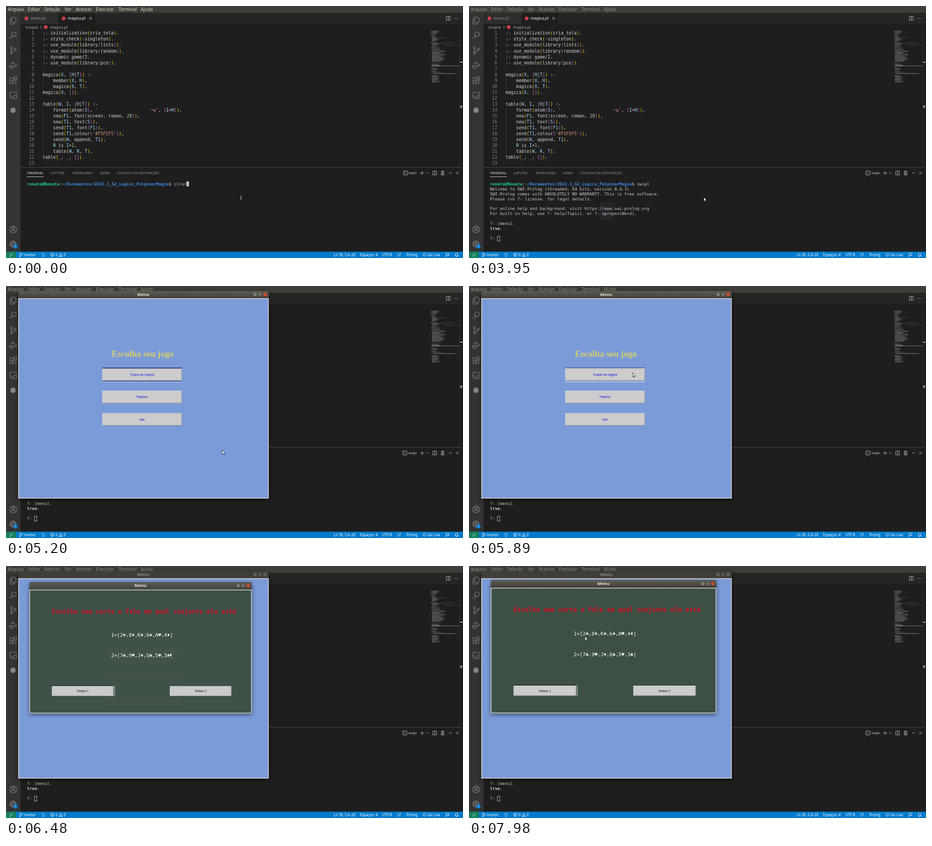
An HTML page for the animation above (8 s loop, 1007 px wide and 556 px high).

```html
<!DOCTYPE html>
<html lang="pt">
<head>
<meta charset="utf-8">
<title>Menu</title>
<style>
html, body { margin: 0; width: 100%; height: 100%; overflow: hidden; background: #1e1e1e; }
svg { display: block; width: 1007px; height: 556px; }
text { white-space: pre; }
.ui { font-family: "Noto Sans", "Open Sans", sans-serif; }
.mono { font-family: "DejaVu Sans Mono", monospace; }
.sans { font-family: "Liberation Sans", Arial, sans-serif; }
.serif { font-family: "Liberation Serif", serif; }
.line { fill: none; stroke: #858585; stroke-width: 1.2; }
.thin { fill: none; stroke: #c5c5c5; stroke-width: .9; }
.win { filter: drop-shadow(0 3px 5px rgba(0, 0, 0, .5)); }
</style>
</head>
<body>
<svg id="stage" viewBox="0 0 1007 556" xml:space="preserve"></svg>
<script>
const LOOP = 8000;
const stage = document.getElementById('stage');

const text = (x, y, str, size, fill, cls = 'ui', extra = '') =>
  `<text class="${cls}" x="${x}" y="${y}" font-size="${size}" fill="${fill}" ${extra}>${str}</text>`;
const rect = (x, y, w, h, fill, extra = '') =>
  `<rect x="${x}" y="${y}" width="${w}" height="${h}" fill="${fill}" ${extra}/>`;
const dot = (x, y, r, fill, extra = '') => `<circle cx="${x}" cy="${y}" r="${r}" fill="${fill}" ${extra}/>`;
const path = (d, cls = 'thin', extra = '') => `<path class="${cls}" d="${d}" ${extra}/>`;
const group = (id, body, extra = '') => `<g id="${id}" ${extra}>${body}</g>`;
const MID = 'text-anchor="middle"', END = 'text-anchor="end"', BOLD = 'font-weight="bold"';

// ---------- editor ----------
const code = `:- initialization(cria_tela).
:- style_check(-singleton).
:- use_module(library(lists)).
:- use_module(library(random)).
:- dynamic game/2.
:- use_module(library(pce)).

magica(X, [H|T]) :-
    member(X, H),
    magica(X, T).
magica(X, []).

table(W, I, [H|T]) :-
    format(atom(S), '${' '.repeat(20)}~w', (I=H)),
    new(F1, font(screen, roman, 20)),
    new(T1, text(S)),
    send(T1, font(F1)),
    send(T1,colour('#F5F5F5')),
    send(W, append, T1),
    R is I+1,
    table(W, R, T).
table(_, _, []).

play(W):-`.split('\n');

const LINE = 13.04, SIZE = 9.65;
const pairs = ['#ffd700', '#da70d6', '#179fff'];

function paint(src) {
  let depth = 0;
  return src.replace(/'[^']*'|[A-Z_]\w*|\d+|[a-z]\w*|[()[\]]/g, tok => {
    let color = '';
    if (tok[0] === "'") color = '#ce9178';
    else if (/[([]/.test(tok)) color = pairs[depth++ % 3];
    else if (/[)\]]/.test(tok)) color = pairs[--depth % 3];
    else if (/^[A-Z_]/.test(tok)) color = '#9cdcfe';
    else if (/^\d/.test(tok)) color = '#b5cea8';
    return color ? `<tspan fill="${color}">${tok}</tspan>` : tok;
  });
}

function editor() {
  let out = rect(0, 0, 1007, 556, '#1e1e1e') + rect(32, 15, 975, 25, '#252526') +
    rect(33, 15, 82.5, 25, '#2d2d2d') + rect(116, 15, 81, 25, '#1e1e1e');
  for (const [x, y] of [[45, 27.5], [127, 27.5], [87.5, 46.5]]) out += dot(x, y, 4.2, '#cc3e44');
  out += text(54, 30.4, 'menu.pl', 8.6, '#969696') + text(136, 30.4, 'magica.pl', 8.6, '#fff') +
    path('M183.800 24.500l5.500 5.500m0-5.500l-5.500 5.500', 'thin', 'style="stroke:#e8e8e8"') +
    text(43, 49.6, 'truque', 8.6, '#a9a9a9') + text(97, 49.6, 'magica.pl', 8.5, '#a9a9a9') +
    path('M75.500 43.800l2.800 3-2.800 3') +
    path('M970.500 23h8.500v8.500h-8.500zM974.800 23v8.500');
  for (const x of [988.5, 992, 995.5]) out += dot(x, 27.5, .8, '#c5c5c5');
  out += '<clipPath id="pane"><path d="M32 53h975v302.500H32z"/></clipPath><g clip-path="url(#pane)">';
  code.forEach((src, i) => {
    const y = 63.4 + i * LINE;
    out += text(62.4, y, i + 1, SIZE, '#858585', 'mono', END) + text(80.7, y, paint(src), SIZE, '#d4d4d4', 'mono');
    if (src[0] === ' ') out += rect(81, y - 10, .8, LINE + .1, '#404040');
  });
  return out + '</g>' + minimap();
}

function minimap() {
  let seed = 7, out = '';
  const rnd = () => (seed = seed * 16807 % 2147483647) / 2147483647;
  const bar = (row, indent, len) => {
    let x = 936.5 + indent * .58;
    const end = x + len * .58;
    while (x < end) {
      const w = 1 + rnd() * 3;
      out += rect(x.toFixed(1), (54.3 + row * 1.16).toFixed(1), Math.min(w, end - x).toFixed(1), .8, '#a0a0a0',
        `opacity="${(.45 + rnd() * .3).toFixed(2)}"`);
      x += w + .5;
    }
  };
  code.slice(0, 23).forEach((src, i) => {
    for (const m of src.matchAll(/\S+(?: \S+)*/g)) bar(i, m.index, m[0].length);
  });
  // first row, row count, longest row
  const blocks = [[24, 6, 32], [31, 2, 34], [34, 3, 36], [38, 22, 56], [63, 5, 40], [70, 5, 32],
    [76, 3, 34], [80, 1, 60], [85, 14, 36]];
  for (const [row, n, max] of blocks)
    for (let i = 0; i < n; i++) bar(row + i, i ? 4 : 0, max * (.45 + rnd() * .5));
  bar(23, 0, 86);
  bar(81, 8, 89);
  bar(82, 8, 90);
  return out + rect(964, 86.2, 35, 1, '#264f78') + rect(937, 131, 62, 2, '#fff', 'opacity=".22"') +
    rect(999, 54, .8, 302, '#3a3a3a') + rect(1000, 123, 7, 2, '#a0a0a0') + rect(1001, 219.5, 4, 5, '#a0a0a0');
}

function sidebar() {
  return rect(0, 15, 32, 527, '#333') +
    path('M12.500 24.500h6l3.500 3.500v8.500h-9.500zM12.500 28H9v12h9v-3.500', 'line') +
    path('M22.500 62.500a5 5 0 1 1-10 0a5 5 0 1 1 10 0M14 66.500l-5 5.500', 'line') +
    path('M12 94v7.500M20.500 97c0 4-6 2.500-8.500 4.500', 'line') +
    [[12, 92], [12, 103.5], [20.5, 95]].map(p => dot(...p, 2, 'none', 'class="line"')).join('') +
    path('M13 128v-4.500l10.500 7-7 4.600M9 134.500a3 3.500 0 1 1 6 0a3 3.500 0 1 1-6 0M7.500 131l2 1.500M7 135h2M16.500 131l-2 1.500', 'line') +
    path('M9 158.500h6.500V171H9zM9 165h13v6H9M17.800 156h5.700v5.700h-5.700z', 'line') +
    path('M16 201.500H9V190.500h14v6M11 204.500h5', 'line') + dot(20, 201, 3.6, 'none', 'class="line"') +
    dot(15.5, 230, 6, '#858585') +
    dot(16, 493, 7.5, 'none', 'class="line"') + dot(16, 490.5, 2.8, 'none', 'class="line"') +
    path('M11 498.500c1-5 9-5 10 0', 'line') +
    dot(15.5, 525, 5.2, 'none', 'class="line"') + dot(15.5, 525, 2, 'none', 'class="line"') +
    dot(15.5, 525, 6.8, 'none', 'class="line" style="stroke-width:2;stroke-dasharray:2.670"') +
    dot(21, 530.5, 4.8, '#007acc') + text(21, 533, 1, 6.5, '#fff', 'ui', MID);
}

function statusbar() {
  const y = 551.9;
  const labels = [[39, 'master'], [109, '0'], [127, '0'], [722, 'Ln 30, Col 20'], [780, 'Espaços: 4'],
    [829, 'UTF-8'], [862, 'LF'], [882, 'Prolog'], [929, 'Go Live']];
  const icons = 'M8 548l2.500 2.500L8 553M14 545.500l-2.500 2.500 2.500 2.500' +
    'M31 547v5M35.500 548.500c0 2-4 1-4.500 3M78.500 549a3.500 3.500 0 0 1 6.500-1.500M85.500 549a3.500 3.500 0 0 1-6.500 1.500' +
    'M100.500 547.500l3 3m0-3l-3 3M120.500 545.500l4 7h-8zM120.500 548v2.500' +
    'M922 549v4M920 551.500a3.500 3.500 0 1 1 4 0M970 545.500h6v5h-4l-2 2zM968.500 552.500l2-2' +
    'M989.500 551.500h7l-1-1.500v-2c0-4-5-4-5 0v2zM992 553h2';
  return rect(0, 542, 1007, 14, '#007acc') + rect(0, 542, 22, 14, '#16825d') +
    path(icons, 'thin', 'style="stroke:#fff"') + dot(102, 549, 3.7, 'none', 'stroke="#fff" stroke-width=".9"') +
    [[31, 546], [31, 552.5], [35.5, 547.5]].map(p => dot(...p, 1.2, '#fff')).join('') +
    labels.map(([x, s]) => text(x, y, s, 8, '#fff')).join('');
}

// ---------- terminal ----------
const CELL = 5.49, ROW = 10.95;
const colX = c => 46.2 + c * CELL;
const rowY = r => 387 + r * ROW;
const term = (c, r, str, extra = '') => text(colX(c), (rowY(r) + 8.7).toFixed(2), str, 9.12, '#ccc', 'mono', extra);

function terminal() {
  const tabs = [[46, 'TERMINAL', '#e7e7e7'], [99, 'JUPYTER'], [147, 'PROBLEMAS'], [207, 'SAÍDA'], [245, 'CONSOLE DE DEPURAÇÃO']];
  const prompt = '<tspan font-weight="bold" fill="#23d18b">renata@Renata</tspan>:' +
    '<tspan font-weight="bold" fill="#3b8eea">~/Documentos/2022.1_G2_Logico_PalpinorMagia</tspan>$ ';
  const welcome = ['Welcome to SWI-Prolog (threaded, 64 bits, version 8.4.3)',
    'SWI-Prolog comes with ABSOLUTELY NO WARRANTY. This is free software.',
    'Please run ?- license. for legal details.', '',
    'For online help and background, visit https://www.swi-prolog.org',
    'For built-in help, use ?- help(Topic). or ?- apropos(Word).'];
  const shell = (id, x, name) => group(id,
    path(`M${x} 364h8.800v8.800h-8.800zM${x + 2.5} 366l2.500 2.400-2.500 2.400`) + text(905, 371.3, name, 7.7, '#ccc', 'ui', END));
  return rect(32, 355.7, 975, .9, '#505050') +
    tabs.map(([x, s, fill = '#969696']) => text(x, 371.2, s, 7.5, fill)).join('') + rect(46, 376.3, 37, .9, '#e7e7e7') +
    shell('bash', 876, 'bash') + shell('swipl', 874.5, 'swipl') +
    path('M912.500 368.500h9M917 364v9M926 367.300l2.300 2.400 2.300-2.400M940.300 364.300h8.500v8.500h-8.500zM944.500 364.300v8.500' +
      'M958.500 365.500h7M960.500 365.300v-1.300h3v1.300M959.300 366v7h5.500v-7M961.200 367.500v4M963 367.500v4M976.200 370l3.300-3.300 3.300 3.300M992 365.500l5.800 5.800m0-5.800l-5.800 5.800') +
    term(0, 0, prompt) + group('typed', term(59, 0, 'clrar')) + group('recalled', term(59, 0, 'swipl')) +
    group('welcome', welcome.map((s, i) => term(0, i + 1, s)).join('')) +
    group('ask', term(0, 8, '?- ')) + group('load', term(3, 8, '[menu].')) +
    group('ready', term(0, 9, 'true.', BOLD) + term(0, 11, '?- ') +
      `<rect x="62.700" y="508" width="5.200" height="10.300" fill="none" stroke="#ccc" stroke-width=".9"/>`) +
    rect(0, 0, 5.6, 10.9, '#ccc', 'id="block"');
}

// ---------- windows ----------
function frame(x, y, w, h, bar, titleX, fill, id, live) {
  const buttons = on => [30, 19, 8].map((d, i) =>
    dot(x + w - d, y + 7.8, 4.2, on && i === 2 ? '#e9562f' : on ? '#8b897f' : '#6a6963', 'stroke="#302f2b" stroke-width=".6"')).join('') +
    path(`M${x + w - 32} ${y + 7.8}h4M${x + w - 20.7} ${y + 6.2}h3.400v3.200h-3.400zM${x + w - 9.5} ${y + 6.3}l3 3m0-3l-3 3`, 'thin', 'style="stroke:#33322e;stroke-width:.8"');
  const top = `M${x} ${y + bar}v${4 - bar}q0-4 4-4h${w - 8}q4 0 4 4v${bar - 4}z`;
  const skin = on => path(top, '', `fill="${on ? 'url(#bar)' : '#3f3e39'}"`) +
    text(titleX, y + 11.3, 'Menu', 9.5, on ? '#e6e2d8' : '#89877f', 'ui', MID + ' ' + BOLD) + buttons(on);
  return group(id + 'On', skin(true)) + (live ? group(id + 'Off', skin(false)) : '') +
    rect(x, y + bar, w, h - bar, '#dcdad5') + rect(x + 1.5, y + bar + 1.5, w - 3, h - bar - 3, fill);
}

const button = (x, y, w, h, label, ink, size) =>
  rect(x, y, w, h, '#f2f2f2') + rect(x + .8, y + .8, w - .8, h - .8, '#77777a') + rect(x + .8, y + .8, w - 1.6, h - 1.6, '#cccccc') +
  text(x + w / 2, y + h / 2 + 2.4, label, size, ink, 'sans', MID);

function menuWindow() {
  const items = ['Truque de mágica', 'Palpinor', 'Sair'];
  return frame(27, 11, 552, 458, 16, 302.5, '#7b9ad8', 'menu', true) +
    text(301.5, 155.8, 'Escolha seu jogo', 19.4, '#d8d06c', 'serif', MID + ' ' + BOLD) +
    rect(212, 179.8, 175.5, 1, '#34467c') + rect(212, 211.2, 175.5, 1, '#e4e9f4') +
    items.map((s, i) => button(212, 181.7 + i * 49.4, 175.5, 27.4, s, '#1010e0', 6.7)).join('') +
    group('focus', rect(212, 181, 175.5, 1, '#24408f') + rect(212, 209.2, 175.5, 1.4, '#1d3a8a'));
}

function gameWindow() {
  return frame(48, 31, 497, 294, 17, 296, '#3d5044', 'game') +
    text(304, 101.2, 'Escolha uma carta e fale em qual conjunto ela está', 13.69, '#cf0a20', 'mono', MID + ' ' + BOLD) +
    text(230.8, 153.2, '1=[2♠,8♦,K♠,6♠,A♥,4♦]', 10.92, '#f5f5f5', 'mono') +
    text(230.8, 199.2, '2=[7♣,9♥,J♦,Q♣,5♥,3♣]', 10.92, '#f5f5f5', 'mono') +
    rect(98, 262, 139, 1, '#1d2721') + rect(236.5, 262.5, 1, 24, '#26332b') + rect(238, 262, 1, 24.5, '#e8ece9') +
    button(98.3, 264, 138, 22.3, 'Deque 1', '#111', 6.9) + button(362, 264, 137.5, 22.3, 'Deque 2', '#111', 6.9);
}

const menus = [[4, 'Arquivo'], [48, 'Editar'], [84, 'Seleção'], [129, 'Ver'], [153.5, 'Acessar'], [198, 'Executar'], [248, 'Terminal'], [297, 'Ajuda']];

stage.innerHTML =
  '<defs><linearGradient id="bar" x2="0" y2="1"><stop stop-color="#5d5c53"/><stop offset="1" stop-color="#403f3a"/></linearGradient></defs>' +
  editor() + sidebar() + terminal() + statusbar() +
  rect(0, 0, 1007, 15, '#3e3d37') +
  group('menubar', menus.map(([x, s]) => text(x, 11, s, 9.85, 'currentColor')).join('')) +
  rect(288, 434, 30, 39, '#8090b0', 'id="seedMenu" opacity=".07"') +
  group('menu', menuWindow(), 'class="win"') +
  rect(283, 303, 28, 27, '#404a50', 'id="seedGame" opacity=".14"') +
  group('game', gameWindow(), 'class="win"') +
  group('beam', path('M516 419.300q1.700 0 1.700 1v5.400q0 1-1.700 1M519.400 419.300q-1.700 0-1.700 1v5.400q0 1 1.700 1')) +
  group('arrow', path('M.4 .4V9.400L2.500 7.500 4 10.700 5.300 10.100 3.900 7H6.600Z', '', 'fill="#fff" stroke="#111" stroke-width=".8" stroke-linejoin="round"'));

// ---------- timeline ----------
const spans = {
  typed: [0, 190], recalled: [190], bash: [0, 940], swipl: [940], welcome: [1120], ask: [1440], load: [1730],
  ready: [3700], block: [0, 3700], beam: [0, 3450], arrow: [3450], seedMenu: [3700, 4090], menu: [4090],
  menuOn: [0, 6340], menuOff: [6340], focus: [0, 5750], seedGame: [6400, 6480], game: [6480]
};
const block = [[0, 64, 0], [730, 0, 1], [1120, 0, 8], [1440, 3, 8], [1730, 10, 8], [2910, 0, 9]];

const pointer = [[0, 517, 421.5]];
for (let k = 0; k <= 10; k++) {
  const p = 1 - (1 - k / 10) ** 2.4;
  pointer.push([5200 + k * 69, 476 - 116 * p, 362 - 171 * p]);
}
pointer.push([6810, 354, 184], [6910, 348.5, 175.5], [7150, 300, 150], [7220, 250, 127], [7290, 223.5, 117.5],
  [7460, 225, 143], [7660, 232, 134], [7724, 243, 127], [7788, 255, 128], [7852, 262, 136], [7916, 260, 147], [7980, 255, 155]);

const el = id => document.getElementById(id);
const nodes = Object.fromEntries([...Object.keys(spans), 'menubar'].map(id => [id, el(id)]));
const at = (steps, t) => steps.findLast(s => s[0] <= t);
const zoom = (node, active, x, y) => {
  node.setAttribute('transform', active ? `translate(${x} ${y}) scale(.986) translate(${-x} ${-y})` : '');
  node.setAttribute('opacity', active ? .97 : 1);
};

function draw() {
  const t = performance.now() % LOOP;
  for (const [id, [from, to = LOOP]] of Object.entries(spans))
    nodes[id].style.display = t >= from && t < to ? '' : 'none';
  const [, col, row] = at(block, t), [, x, y] = at(pointer, t);
  nodes.block.setAttribute('transform', `translate(${colX(col)} ${rowY(row)})`);
  nodes.arrow.setAttribute('transform', `translate(${x} ${y})`);
  nodes.menubar.style.color = t < 3700 ? '#dfdbd2' : '#93918a';
  zoom(nodes.menu, t < 4280, 303, 380);
  zoom(nodes.game, t < 6540, 298, 340);
  requestAnimationFrame(draw);
}
draw();
</script>
</body>
</html>
```
